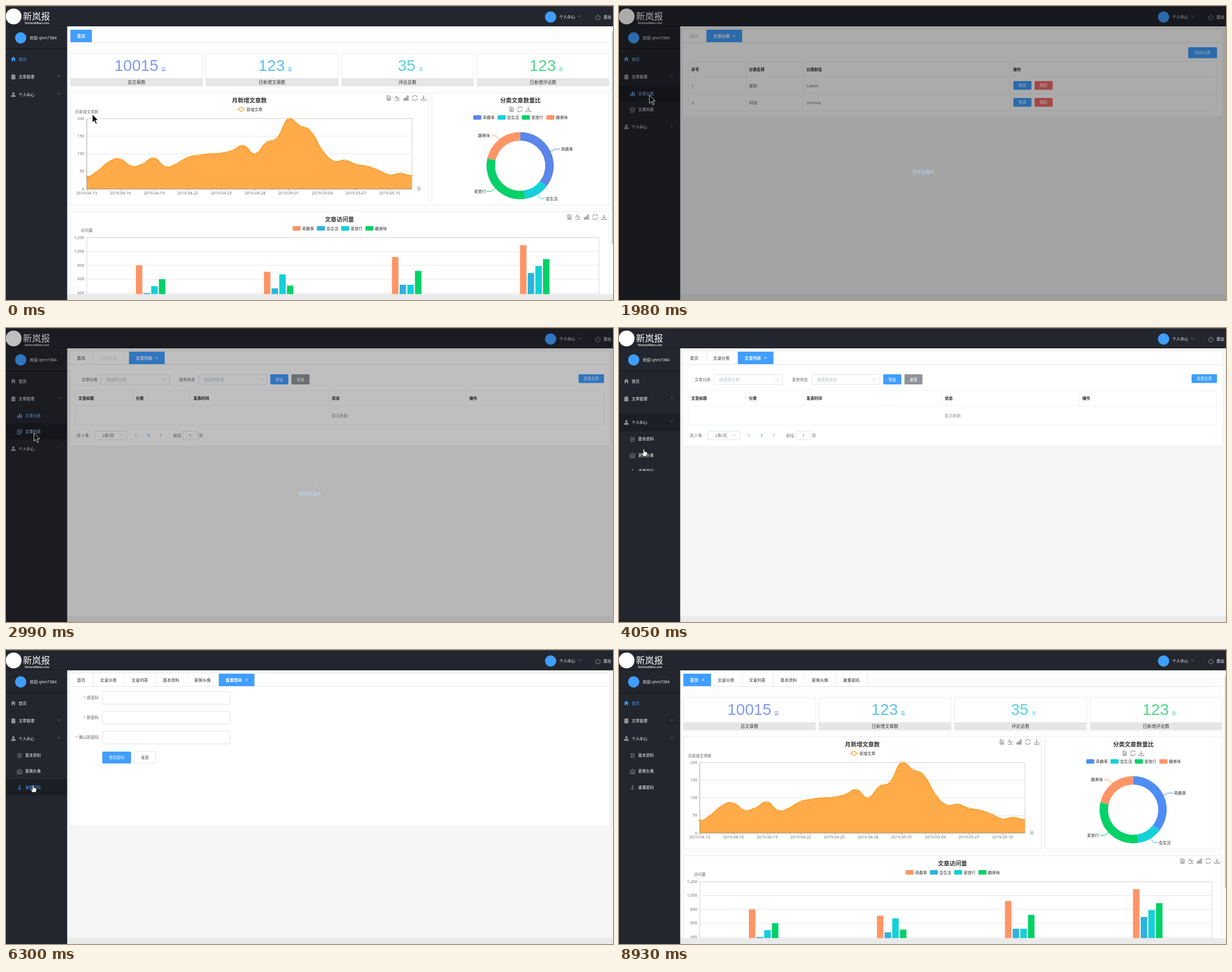
Animation, 1075 px wide and 521 px high, one loop 9.42 s. Source, as an HTML page:

```html
<!DOCTYPE html>
<html lang="zh">
<head>
<meta charset="utf-8">
<title>后台管理</title>
<style>
html, body { margin: 0; width: 1075px; height: 521px; overflow: hidden; background: #f5f5f5; }
svg { display: block; }
#stage { font-family: "Open Sans", "Noto Sans CJK SC", "Noto Sans CJK", sans-serif; }
</style>
</head>
<body>
<svg id="stage" width="1075" height="521" viewBox="0 0 1075 521"></svg>
<script>
const LOOP = 9420;
const BLUE = '#409eff', DARK = '#23262e', HOVER = '#1c1e25', EDGE = '#ebeef5', FIELD = '#dcdfe6', GREY = '#909399';
const CORAL = '#ff9567', SKY = '#2eb3dd', CYAN = '#14d0d8', GREEN = '#04d167';
const stage = document.getElementById('stage');

// ---------- helpers ----------
function set(node, attrs) {
  for (const k in attrs) node.setAttribute(k, attrs[k]);
  return node;
}
function add(parent, tag, attrs) {
  const node = document.createElementNS('http://www.w3.org/2000/svg', tag);
  parent.appendChild(node);
  return set(node, attrs);
}
const group = (p, attrs) => add(p, 'g', attrs);
const rect = (p, x, y, width, height, fill, more) => add(p, 'rect', { x, y, width, height, fill, ...more });
const path = (p, d, stroke, more) => add(p, 'path', { d, stroke, fill: 'none', 'stroke-width': 1, ...more });
const circle = (p, cx, cy, r, fill, more) => add(p, 'circle', { cx, cy, r, fill, ...more });
// y is the optical middle of the line
function text(p, x, y, s, fill = '#333', size = 7, more) {
  const node = add(p, 'text', { x, y: y + size * .37, fill, 'font-size': size, ...more });
  node.textContent = s;
  return node;
}
const MID = { 'text-anchor': 'middle' }, END = { 'text-anchor': 'end' }, BOLD = { 'font-weight': 700 };
const THIN = { 'stroke-width': .8 };
const clamp = v => Math.max(0, Math.min(1, v));
const ease = v => (v = clamp(v), v * v * (3 - 2 * v));
const rgb = c => [1, 3, 5].map(i => parseInt(c.slice(i, i + 2), 16));
function mix(a, b, k) {
  const p = rgb(a), q = rgb(b);
  return `rgb(${p.map((v, i) => Math.round(v + (q[i] - v) * k))})`;
}
const show = (node, on) => node.setAttribute('display', on ? 'inline' : 'none');

function button(p, x, y, w, h, label, fill, size = 7) {
  const plain = fill === '#ffffff';
  rect(p, x, y, w, h, fill, { rx: 1.6, ...(plain && { stroke: FIELD, ...THIN }) });
  text(p, x + w / 2, y + h / 2, label, plain ? '#606266' : '#fff', size, { ...MID, 'font-weight': 500 });
}
function field(p, x, y, w, h, s, chevron) {
  rect(p, x, y, w, h, '#fff', { rx: 2, stroke: FIELD, 'stroke-width': .9 });
  if (s) text(p, x + 9, y + h / 2, s, '#b4b8c0', 7.3);
  if (chevron) path(p, `M${x + w - 12.5} ${y + h / 2 - 1.5}l3 3 3-3`, '#b4b8c0', THIN);
}
// ruled table; column lines run through the first `ruled` rows
function table(p, x, y, w, rows, ruled, cols, heads) {
  let top = y, d = '', depth = 0;
  rows.forEach((h, i) => {
    d += `M${x} ${top}h${w}`;
    top += h;
    if (i < ruled) depth += h;
  });
  d += `M${x} ${y}V${top}h${w}V${y}`;
  cols.forEach((c, i) => {
    if (i) d += `M${c} ${y}v${depth}`;
    text(p, c + 5.5, y + 13.5, heads[i], '#222', 6.9, BOLD);
  });
  path(p, d, EDGE, THIN);
}

// ---------- dashboard ----------
const pages = [0, 1, 2, 3, 4, 5].map(() => group(stage));
const TOOLS = {
  doc: 'M-3-4h4l2 2v6h-6zM-1.5-1h3M-1.5 1h3M-1.5 2.6h3',
  line: 'M-4.5 0h2l1.5-4 2.4 6 1-2h2.2M-4 4h8.5',
  bars: 'M-4 4v-3h2v3zM-1 4v-5h2v5zM2 4v-8h2v8z',
  redo: 'M-4.3-.6a4.3 4.3 0 0 1 8-1.6v-2M4.3.6a4.3 4.3 0 0 1-8 1.6v2',
  save: 'M0-4.4v6.4M-2.6-.6l2.6 2.6 2.6-2.6M-4.3 2v2.2h8.6v-2.2'
};
function tools(p, y, list) {
  for (const [name, x] of list) path(p, TOOLS[name], '#666', { transform: `translate(${x} ${y})`, 'stroke-width': .85 });
}
const blues = [];
function legend(p, y, xs, colors) {
  ['奇趣事', '会生活', '爱旅行', '趣美味'].forEach((s, i) => {
    const box = rect(p, xs[i], y - 4, 14.3, 8, colors[i], { rx: 1.6 });
    if (colors[i] === 'pie') blues.push(box);
    text(p, xs[i] + 17, y, s);
  });
}
const home = pages[0];
rect(home, 108, 36, 967, 475, '#fdfdfd');
rect(home, 1073, 45, 2, 377, '#c8c8cc');

[[114, '10015', 192, 275, '篇', '#8199ec', '总文章数'],
 [354, '123', 447, 499, '篇', '#5dc0e6', '日新增文章数'],
 [594, '35', 694, 731, '条', '#56d3dd', '评论总数'],
 [834, '123', 927, 979, '条', '#4cd98a', '日新增评论数']].forEach(([x, n, nx, ux, unit, color, label]) => {
  rect(home, x + .5, 84.5, 233.5, 57.5, '#fff', { stroke: '#ececec' });
  rect(home, x, 128, 234, 14, '#e6e6e6');
  text(home, nx, 105, n, color, 28, { 'font-family': '"Liberation Sans", sans-serif' });
  text(home, ux, 112, unit, color, 8);
  text(home, x + 117, 135, label, '#333', 7.9, MID);
});

[[114, 153.5, 633.5, 199], [754, 153.5, 313.5, 199], [114, 364.5, 953.5, 170]].forEach(([x, y, w, h]) =>
  rect(home, x + .5, y, w, h, '#fff', { stroke: '#ececec' }));
const title = (x, y, s) => text(home, x, y, s, '#333', 10.3, { ...MID, ...BOLD });

// area chart
title(431, 167, '月新增文章数');
tools(home, 163, [['doc', 678], ['line', 692.5], ['bars', 708.5], ['redo', 724], ['save', 739.5]]);
path(home, 'M409 183h14.5', '#ff9a1f', { 'stroke-width': 1.2 });
circle(home, 416.3, 183, 3.6, '#fff', { stroke: '#ff9a1f', 'stroke-width': 1.2 });
text(home, 426, 183, '新增文章');
text(home, 143, 187, '月新增文章数', '#666', 6.9, MID);
text(home, 727.5, 323.5, '日', '#666');
const AXIS = { 'stroke-width': .9 };
for (let v = 0; v <= 200; v += 50) {
  const y = 324.5 - v * .625;
  path(home, `M143 ${y}H719`, '#e2e2e2', AXIS);
  text(home, 138.5, y - .5, v, '#666', 7.1, END);
}
path(home, 'M143 199.5H719V324.5', '#d0d0d0', AXIS);
const visits = [36, 52, 78, 85, 65, 72, 88, 64, 72, 90, 96, 100, 102, 110, 123, 100, 132, 146, 200, 180, 163, 110, 80, 82, 70, 65, 54, 40, 45, 38];
const pts = visits.map((v, i) => [143 + i * 576 / 29, 324.5 - v * .625]);
let curve = 'M' + pts[0];
const slope = i => (pts[Math.min(i + 1, 29)][1] - pts[Math.max(i - 1, 0)][1]) * .25;
for (let i = 1; i < pts.length; i++) {
  const [a, b] = [pts[i - 1], pts[i]], dx = (b[0] - a[0]) / 2;
  const y1 = i === 1 ? a[1] : a[1] + slope(i - 1), y2 = i === 29 ? b[1] : b[1] - slope(i);
  curve += `C${a[0] + dx} ${Math.max(199.5, y1)} ${b[0] - dx} ${Math.max(199.5, y2)} ${b}`;
}
path(home, curve + 'V324.5H143Z', 'none', { fill: '#ffab4a' });
path(home, curve, '#ff8f0a', { 'stroke-width': 1.3 });
pts.forEach(([x, y]) => circle(home, x, y, 1.4, '#fff', { stroke: '#ff8f0a', ...THIN }));
path(home, 'M143 199.5V324.5H719', '#888', THIN);
'04-13 04-16 04-19 04-22 04-25 04-28 05-01 05-04 05-07 05-10'.split(' ').forEach((d, i) => {
  const x = 143 + i * 59.59;
  path(home, `M${x} 324.5v3`, '#888', THIN);
  text(home, x, 331, '2019-' + d, '#666', 7.1, MID);
});

// doughnut
title(911, 167, '分类文章数量比');
tools(home, 183, [['doc', 895.5], ['redo', 910], ['save', 925]]);
legend(home, 197.5, [827.5, 870.5, 913.5, 957], ['pie', CYAN, GREEN, CORAL]);
const polar = (deg, r) => [910.5 + r * Math.sin(deg * Math.PI / 180), 283 - r * Math.cos(deg * Math.PI / 180)];
const R = 59.5, HOLE = 44.5;
[[0, 127.7, 'pie'], [127.7, 171.5, CYAN], [171.5, 282.6, GREEN], [282.6, 360, CORAL]].forEach(([a, b, fill]) => {
  const d = `M${polar(a, R)}A${R} ${R} 0 0 1 ${polar(b, R)}L${polar(b, HOLE)}A${HOLE} ${HOLE} 0 0 0 ${polar(a, HOLE)}Z`;
  const arc = path(home, d, 'none', { fill });
  if (fill === 'pie') blues.push(arc);
});
const lead = path(home, 'M964 258l8-4.5h9');
path(home, 'M941 334l6 7.5h7', CYAN);
path(home, 'M867 323l-8 5.5h-8', GREEN);
path(home, 'M874 236l-7-6h-8', CORAL);
text(home, 983, 253, '奇趣事');
text(home, 956, 341.5, '会生活');
text(home, 829, 328.5, '爱旅行');
text(home, 836, 229.5, '趣美味');

// bar chart
title(590.5, 378, '文章访问量');
tools(home, 374, [['doc', 998], ['line', 1012.5], ['bars', 1028], ['redo', 1043.5], ['save', 1059]]);
const barColors = [CORAL, SKY, CYAN, GREEN];
legend(home, 394, [507.5, 550.5, 593.5, 636.5], barColors);
text(home, 143, 397.5, '访问量', '#666', 7, MID);
const barY = v => 410.5 + (1200 - v) * .1227;
for (let v = 400; v <= 1200; v += 200) {
  path(home, `M143 ${barY(v)}H1050`, '#e2e2e2', AXIS);
  text(home, 138.5, barY(v) - .5, v.toLocaleString('en-US'), '#666', 7.1, END);
}
path(home, 'M143 520V410.5H1050V520', '#d0d0d0', AXIS);
[[800, 400, 500, 600], [708, 468, 670, 507], [920, 520, 520, 720], [1090, 690, 790, 890]].forEach((bars, g) =>
  bars.forEach((v, i) => rect(home, 230 + g * 226.75 + i * 13.6, barY(v), 11.5, 521 - barY(v), barColors[i])));

// ---------- other pages ----------
const card = (p, bottom) => rect(p, 114, 42, 954, bottom - 42, '#fff');
const FORM = '#606266';

const cats = pages[1];
card(cats, 194.5);
button(cats, 1008, 73, 51, 19.5, '添加分类', BLUE);
table(cats, 122.5, 98.5, 936, [27, 30, 30], 3, [122.5, 224.5, 326.5, 692.5], ['序号', '分类名称', '分类别名', '操作']);
[['1', '最新', 'Latest'], ['2', '科技', 'Science']].forEach((row, i) => {
  const y = 141 + i * 30;
  row.forEach((s, j) => text(cats, 128.5 + j * 102, y, s, FORM, 7.2));
  button(cats, 698.5, y - 8, 32, 15.5, '修改', BLUE, 6.8);
  button(cats, 736, y - 8, 32, 15.5, '删除', '#f56c6c', 6.8);
});

const list = pages[2];
card(list, 208);
text(list, 134, 91, '文章分类', FORM);
field(list, 168, 82.5, 121.5, 17.5, '请选择分类', true);
text(list, 306.5, 91, '发布状态', FORM);
field(list, 341, 82.5, 121, 17.5, '请选择状态', true);
button(list, 468, 82, 32, 18, '筛选', BLUE, 6.8);
button(list, 505.5, 82, 32, 18, '重置', GREY, 6.8);
button(list, 1014, 82, 45, 15.5, '发表文章', BLUE, 6.8);
table(list, 122.5, 111, 936, [27, 34], 1, [122.5, 224.5, 326.5, 571.5, 815], ['文章标题', '分类', '发表时间', '状态', '操作']);
text(list, 591, 155.5, '暂无数据', GREY, 7, MID);
text(list, 125, 190, '共 0 条', FORM, 7.2);
field(list, 157, 182.5, 57, 15.5, '', true);
text(list, 181, 190, '2条/页', FORM, 7.2, MID);
path(list, 'M231.5 187l-2.5 3 2.5 3M273 187l2.5 3-2.5 3', '#888', THIN);
text(list, 252.5, 190, '1', BLUE, 7.2, { ...MID, ...BOLD });
text(list, 296, 190, '前往', FORM, 7.2);
field(list, 313.5, 182.5, 26, 15.5);
text(list, 326.5, 190, '1', FORM, 7.2, MID);
text(list, 341.5, 190, '页', FORM, 7.2);

function form(p, bottom, labels, submit) {
  card(p, bottom);
  labels.forEach((s, i) => {
    const y = 84.5 + i * 35.2;
    const label = text(p, 164, y, '', FORM, 7, END);
    label.innerHTML = `<tspan fill="#f56c6c">* </tspan>${s}`;
    field(p, 170.5, y - 11, 226.5, 22.5);
  });
  button(p, 170.5, 180, 51, 21, submit, BLUE);
  button(p, 227.5, 180, 37, 21, '重置', '#ffffff');
}
form(pages[3], 229, ['登录名称', '用户昵称', '用户邮箱'], '提交修改');
form(pages[5], 311, ['原密码', '新密码', '确认新密码'], '修改密码');

const face = pages[4];
card(face, 311);
rect(face, 123, 73, 190, 190, '#f3f6fa', { stroke: FIELD });
circle(face, 218, 168, 88, BLUE);
button(face, 123, 280, 51, 21, '选择头像', BLUE);
button(face, 180, 280, 51, 21, '上传头像', '#67c23a');

rect(stage, 108, 510.5, 967, 10.5, '#eaeaea');

// ---------- tabs ----------
const NAMES = ['首页', '文章分类', '文章列表', '基本资料', '更换头像', '重置密码'];
const clicks = [[0, 0], [1900, 1], [2930, 2], [4750, 3], [5450, 4], [6100, 5], [7150, 0]];
const born = NAMES.map((_, i) => clicks[i][0]);
const BACK = clicks[6][0];
path(stage, 'M114 64.5H1068', '#e4e7ed');
const tabs = NAMES.map(s => {
  const g = group(stage);
  return {
    g,
    bg: rect(g, 0, 42, 10, 22, '#fff'),
    label: text(g, 11.8, 53, s, '#333', 7.35),
    close: path(g, 'M-2 51l4 4m0-4l-4 4', '#fff', THIN),
    edge: path(g, 'M-.5 42v22', '#e4e7ed')
  };
});
function drawTabs(t, cur, prev, dt) {
  const k = clamp((dt - 70) / 130), fade = ease((dt - 25) / 140);
  const alone = t < born[1];
  let x = 114;
  tabs.forEach((tab, i) => {
    const on = t >= born[i], active = i === cur;
    show(tab.g, on);
    if (!on) return;
    let open = 0;
    if (active) open = t < BACK ? 1 : k;
    else if (i === prev && i) open = 1 - k;
    const w = alone ? 38 : (i ? 55.5 : 41) + open * (i ? 7.5 : 8);
    set(tab.g, { transform: `translate(${x} 0)` });
    set(tab.bg, { width: w, fill: active ? BLUE : '#fff' });
    set(tab.label, {
      fill: active ? '#fff' : i === prev ? mix('#ffffff', '#303133', fade) : '#303133',
      'font-weight': active ? 700 : 400
    });
    show(tab.close, active && !alone);
    set(tab.close, { transform: `translate(${w - 14.2} 0)` });
    show(tab.edge, !active);
    set(tab.edge, { transform: `translate(${w} 0)` });
    x += w;
  });
}

// ---------- sidebar and header ----------
rect(stage, 0, 36, 108.4, 485, DARK);
rect(stage, 0, 0, 1075, 36, DARK);
rect(stage, 0, 0, 1075, 1, '#5b5d63');
rect(stage, 0, 35, 1075, 1, '#1b1d23');
rect(stage, 0, 75.5, 108, 1, '#0f1014');
circle(stage, 13.5, 18.5, 14, '#fff');
text(stage, 30, 18, '新岚报', '#fff', 16);
text(stage, 33, 30, 'VelmoradNews.com', '#ddd', 4.6, { 'font-family': '"Liberation Sans", sans-serif', ...BOLD });
circle(stage, 964.5, 19.5, 10, BLUE);
text(stage, 980, 19.5, '个人中心', '#fff');
path(stage, 'M1013 17l2.5 2.5 2.5-2.5', '#999', THIN);
path(stage, 'M1046 17.2a4 4 0 1 0 4.5 0M1048.3 15v4.5', '#aaa', { 'stroke-width': .9 });
text(stage, 1058, 19.5, '退出', '#fff');
circle(stage, 26, 56.5, 10, BLUE);
text(stage, 42, 56.5, '欢迎 qhm7384', '#fff', 7.1);

// path, filled?
const ICONS = {
  home: ['M-4.3.2L0-4 4.3.2H3V4H1V1H-1V4H-3V.2Z', 1],
  clip: ['M-3.5-3.5h2v-1h3v1h2v8h-7zM-2-1h4v.7h-4zM-2 1h4v.7h-4z', 1],
  user: ['M0-4.2a2.1 2.1 0 0 1 0 4.2a2.1 2.1 0 0 1 0-4.2M-4 4V2.5Q-4 .6-2 .6H2Q4 .6 4 2.5V4Z', 1],
  bars: ['M-4 4V-.5h2V4zM-1 4V-4h2V4zM2 4V-2h2V4z', 1],
  copy: ['M-4-1.5h6v6h-6zM-2-1.5v-2.5h6v6h-2M-2.5.5h3M-2.5 2.5h3', 0],
  tune: ['M-4-3h8M-4 0h8M-4 3h8M-1.5-4v2M2-1v2M-2 2v2', 0],
  shot: ['M-4-2.5h2l1-1.5h2l1 1.5h2v6.5h-8zM0-.8a1.8 1.8 0 0 1 0 3.6a1.8 1.8 0 0 1 0-3.6', 0],
  key: ['M0-4v4M0-3.3h2M0 0a2 2 0 0 1 0 4a2 2 0 0 1 0-4', 0]
};
const items = [];
function item(p, y, icon, s, page, sub, hover = [0, 0]) {
  const g = group(p), h = sub ? 28.5 : 32;
  const over = rect(g, 0, y - h / 2, 108, h, HOVER);
  const [d, solid] = ICONS[icon];
  const mark = path(g, d, 'currentColor', {
    transform: `translate(${sub ? 24 : 13} ${y + (sub ? .5 : 0)})`,
    fill: solid ? 'currentColor' : 'none', 'stroke-width': solid ? 0 : .9
  });
  const label = text(g, sub ? 34 : 22.5, y, s, '#fff', 6.9, { 'font-weight': 500 });
  items.push({ page, over, mark, label, hover });
}
const arrow = (p, y) => ({ y, node: path(p, 'M-2.5-1.2l2.5 2.5 2.5-2.5', '#8a8d94', THIN) });
const turn = (a, k) => set(a.node, { transform: `translate(93.5 ${a.y}) scale(1 ${1 - 2 * k})` });
const fold = (p, y) => add(p, 'svg', { x: 0, y, width: 108, height: 0, overflow: 'hidden' });

item(stage, 94, 'home', '首页', 0);
item(stage, 125.5, 'clip', '文章管理', -1);
const arrow1 = arrow(stage, 124);
const fold1 = fold(stage, 141);
item(fold1, 14, 'bars', NAMES[1], 1, true, [1885, 2000]);
item(fold1, 42.4, 'copy', NAMES[2], 2, true, [2470, 3500]);
const mine = group(stage);
item(mine, 157, 'user', '个人中心', -1, false, [3540, 4400]);
const arrow2 = arrow(mine, 155.5);
const fold2 = fold(mine, 172.5);
item(fold2, 14, 'tune', NAMES[3], 3, true, [4400, 5340]);
item(fold2, 42.4, 'shot', NAMES[4], 4, true, [5340, 6080]);
item(fold2, 70.8, 'key', NAMES[5], 5, true, [6080, 6650]);

function drawMenu(t, cur, prev, dt) {
  const swap = ease((t - 3833) / 300);
  const open1 = ease((t - 1240) / 300) - swap * (t > 3833);
  set(fold1, { height: 57 * open1 });
  set(fold2, { height: 86 * swap });
  set(mine, { transform: `translate(0 ${57 * open1})` });
  turn(arrow1, open1);
  turn(arrow2, swap);
  const k = ease(dt / 160);
  for (const it of items) {
    const lit = it.page < 0 ? 0 : it.page === cur ? k : it.page === prev ? 1 - k : 0;
    set(it.label, { fill: mix('#ffffff', BLUE, lit) });
    set(it.mark, { color: mix(GREY, BLUE, lit) });
    show(it.over, t >= it.hover[0] && t < it.hover[1]);
  }
}

// ---------- loading mask ----------
const mask = group(stage);
rect(mask, 0, 0, 1075, 521, '#000', { opacity: .8 });
const spin = circle(mask, 539, 274, 10, 'none', { stroke: BLUE, 'stroke-width': 1.2, 'stroke-linecap': 'round' });
text(mask, 539, 294, '拼命加载中', BLUE, 7.8, MID);
function drawMask(cur, dt) {
  const on = (cur === 1 || cur === 2) && dt < 220;
  show(mask, on);
  if (!on) return;
  const level = dt < 85 ? dt / 85 : Math.pow(1 - (dt - 85) / 135, 2.4);
  set(mask, { opacity: .43 * level });
  set(spin, { 'stroke-dasharray': `${dt * .01} 80`, transform: `rotate(${dt * .18 - 8} 539 274)` });
}

// ---------- pointer ----------
const pointer = group(stage);
const tip = path(pointer, 'M0 0V14.5L3.4 11.3L5.9 17L8.2 16L5.7 10.4H10Z', '#fff', { fill: '#000', ...THIN });
const hand = path(pointer, 'M-1 1Q0-.5 1 1V5L5 6Q6.2 6.5 6 8L5 13H-1.5L-4 8.5Q-3.5 7-1 8.5Z', '#222', { fill: '#fff', 'stroke-width': .7 });
// time, x, y, hand
const moves = [
  [0, 153, 192, 0], [300, 153, 192, 0], [680, 67, 121, 1], [1885, 67, 121, 1], [1886, 54, 158, 0], [2350, 54, 158, 0],
  [2570, 49.5, 186, 0], [3350, 49.5, 186, 0], [3600, 43, 207, 1], [3840, 43, 207, 1], [4030, 44, 214, 1],
  [4150, 44, 214, 1], [4500, 46, 188, 1], [5280, 46, 188, 1], [5430, 46, 212, 1], [6050, 46, 212, 1], [6110, 48, 239, 1],
  [6550, 48, 239, 1], [6900, 63, 90, 1], [7730, 63, 90, 1], [8000, 260, 53, 0], [8650, 926, 317, 0],
  [8680, 926, 317, 0], [8910, 1020, 523, 0], [LOOP, 1020, 523, 0]
];
function drawPointer(t) {
  const i = moves.findIndex(m => m[0] > t);
  const a = moves[i - 1], b = moves[i];
  const k = ease((t - a[0]) / (b[0] - a[0]));
  set(pointer, { transform: `translate(${a[1] + (b[1] - a[1]) * k} ${a[2] + (b[2] - a[2]) * k})` });
  const grip = k < .8 ? a[3] : b[3];
  show(hand, grip);
  show(tip, !grip);
}

// ---------- clock ----------
function draw(t) {
  let n = clicks.length - 1;
  while (clicks[n][0] > t) n--;
  const cur = clicks[n][1], prev = n ? clicks[n - 1][1] : -1;
  const dt = n ? t - clicks[n][0] : LOOP;
  pages.forEach((p, i) => show(p, i === cur));
  const blue = t < BACK ? '#5b85e8' : '#4f8df5';
  blues.forEach(b => set(b, { fill: blue }));
  set(lead, { stroke: blue });
  drawTabs(t, cur, prev, dt);
  drawMenu(t, cur, prev, dt);
  drawMask(cur, dt);
  drawPointer(t);
}
const start = performance.now();
function tick() {
  draw((performance.now() - start) % LOOP);
  requestAnimationFrame(tick);
}
tick();
</script>
</body>
</html>
```
